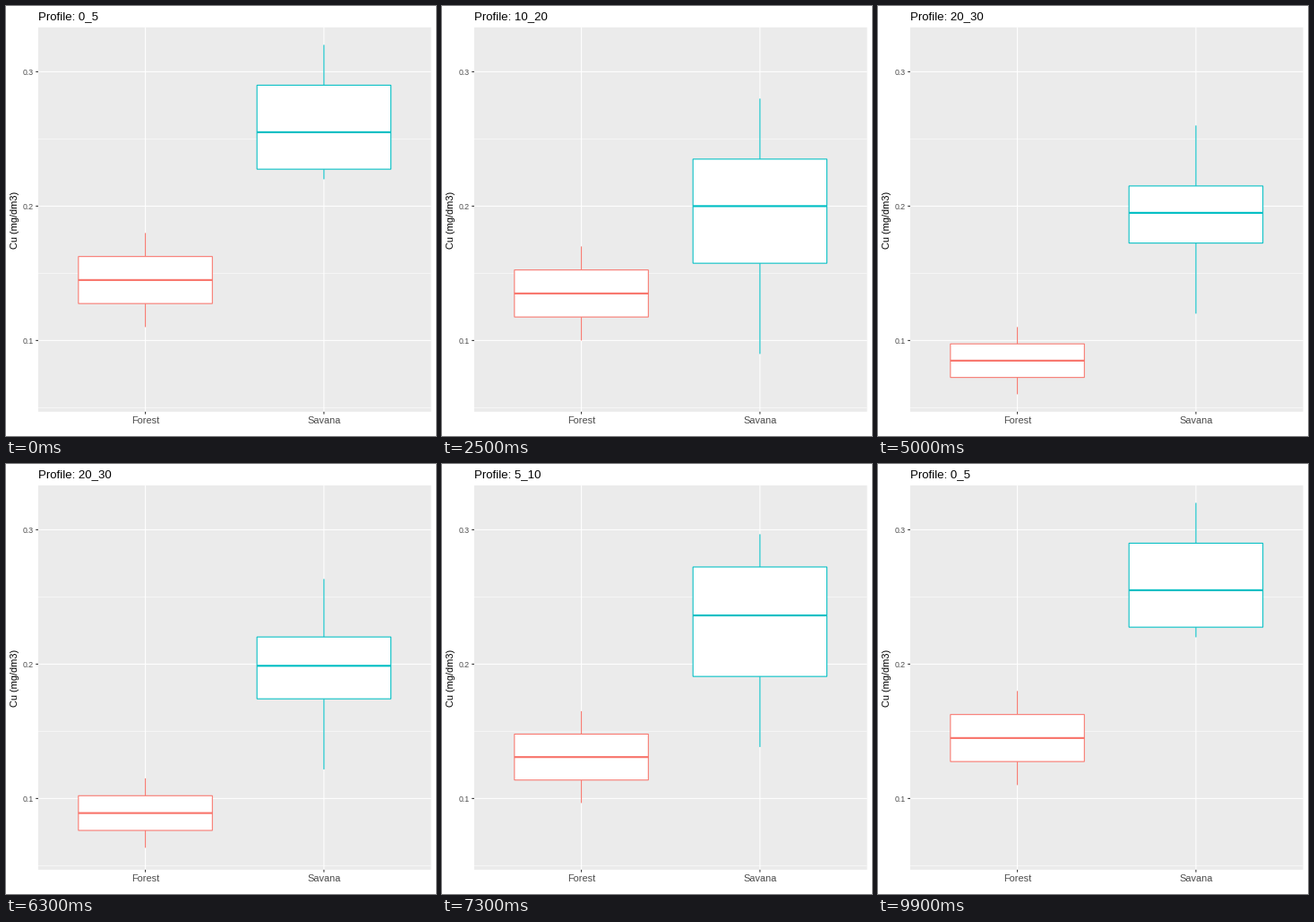
These frames come from a looping animation (480x480 px, 10000 ms). A matplotlib script:

```python
import matplotlib.pyplot as plt
import numpy as np
from matplotlib.animation import FuncAnimation
from matplotlib.patches import Rectangle

plt.rcParams["font.family"] = "Liberation Sans"

SIZE, DPI = 480, 72
LEFT, RIGHT, TOP, BOTTOM = 36, 474.5, 23.9, 452.9
UNIT = (RIGHT - LEFT) / 2.2          # width of one category
HALF = 0.375 * UNIT
LINE = 1.07

# low whisker, lower hinge, median, upper hinge, high whisker
PROFILES = [
    ("0_5", [[.11, .1275, .145, .1625, .18], [.22, .2275, .255, .29, .32]]),
    ("10_20", [[.10, .1175, .135, .1525, .17], [.09, .1575, .20, .235, .28]]),
    ("20_30", [[.06, .0725, .085, .0975, .11], [.12, .1725, .195, .215, .26]]),
    ("5_10", [[.10, .1175, .135, .1525, .17], [.14, .1925, .24, .2775, .30]]),
]
NAMES = [name for name, _ in PROFILES]
STATS = np.array([stats for _, stats in PROFILES])
GROUPS = [("Forest", "#F8766D"), ("Savana", "#00BFC4")]

# last still step and arrival step of each move
MOVES = [(12, 25), (38, 50), (62, 74), (87, 99)]


def y_px(value):
    return 73.4 + (0.3 - value) * 1500


def x_px(index):
    return LEFT + (index + 0.6) * UNIT


fig = plt.figure(figsize=(SIZE / DPI, SIZE / DPI), dpi=DPI, facecolor="white")
ax = fig.add_axes([0, 0, 1, 1])
ax.set_xlim(0, SIZE)
ax.set_ylim(SIZE, 0)
ax.axis("off")


def line(xs, ys, color, width=LINE, z=1):
    return ax.plot(xs, ys, color=color, lw=width, zorder=z, snap=False,
                   solid_capstyle="butt")[0]


def label(x, y, text, size, color, **kw):
    return ax.text(x, y, text, fontsize=size, color=color, va="baseline", **kw)


ax.add_patch(Rectangle((LEFT, TOP), RIGHT - LEFT, BOTTOM - TOP, fc="#EBEBEB",
                       lw=0, zorder=0, snap=False))

for v in (0.05, 0.15, 0.25):
    line([LEFT, RIGHT], [y_px(v)] * 2, "white", LINE / 2)
for v in (0.1, 0.2, 0.3):
    y = y_px(v)
    line([LEFT, RIGHT], [y, y], "white")
    line([LEFT - 2.75, LEFT], [y, y], "#333333")
    label(LEFT - 4.95, y + 3.15, f"{v:.1f}", 8.8, "#4D4D4D", ha="right")
for i, (name, _) in enumerate(GROUPS):
    x = x_px(i)
    line([x, x], [TOP, BOTTOM], "white")
    line([x, x], [BOTTOM, BOTTOM + 2.75], "#333333")
    label(x, 465.9, name, 11, "#4D4D4D", ha="center")

label(13.4, (TOP + BOTTOM) / 2, "Cu (mg/dm3)", 11, "black", rotation=90,
      ha="right", rotation_mode="anchor").set_ha("center")
title = label(LEFT, 15, "", 13.2, "black", ha="left")


class Box:
    def __init__(self, x, color):
        self.upper = line([x, x], [0, 0], color, z=2)
        self.lower = line([x, x], [0, 0], color, z=2)
        self.body = Rectangle((x - HALF, 0), 2 * HALF, 0, fc="white", ec=color,
                              lw=LINE, zorder=3, snap=False)
        ax.add_patch(self.body)
        self.middle = line([x - HALF, x + HALF], [0, 0], color, 2 * LINE, 4)

    def place(self, stats):
        low, q1, med, q3, high = y_px(stats)
        self.upper.set_ydata([q3, high])
        self.lower.set_ydata([q1, low])
        self.body.set_y(q3)
        self.body.set_height(q1 - q3)
        self.middle.set_ydata([med, med])


boxes = [Box(x_px(i), color) for i, (_, color) in enumerate(GROUPS)]


def state_at(step):
    """Return the current profile, the next one and the progress between."""
    for i, (start, end) in enumerate(MOVES):
        if step < end:
            return i, (i + 1) % len(MOVES), max(0, step - start) / (end - start)
    return 0, 0, 0


def update(step):
    a, b, p = state_at(step)
    title.set_text("Profile: " + NAMES[b if p > 0.5 else a])
    for box, stats in zip(boxes, STATS[a] + (STATS[b] - STATS[a]) * p):
        box.place(stats)
    return []


anim = FuncAnimation(fig, update, frames=100, interval=100, repeat=True,
                     repeat_delay=0, init_func=lambda: update(0))
plt.show()
```
